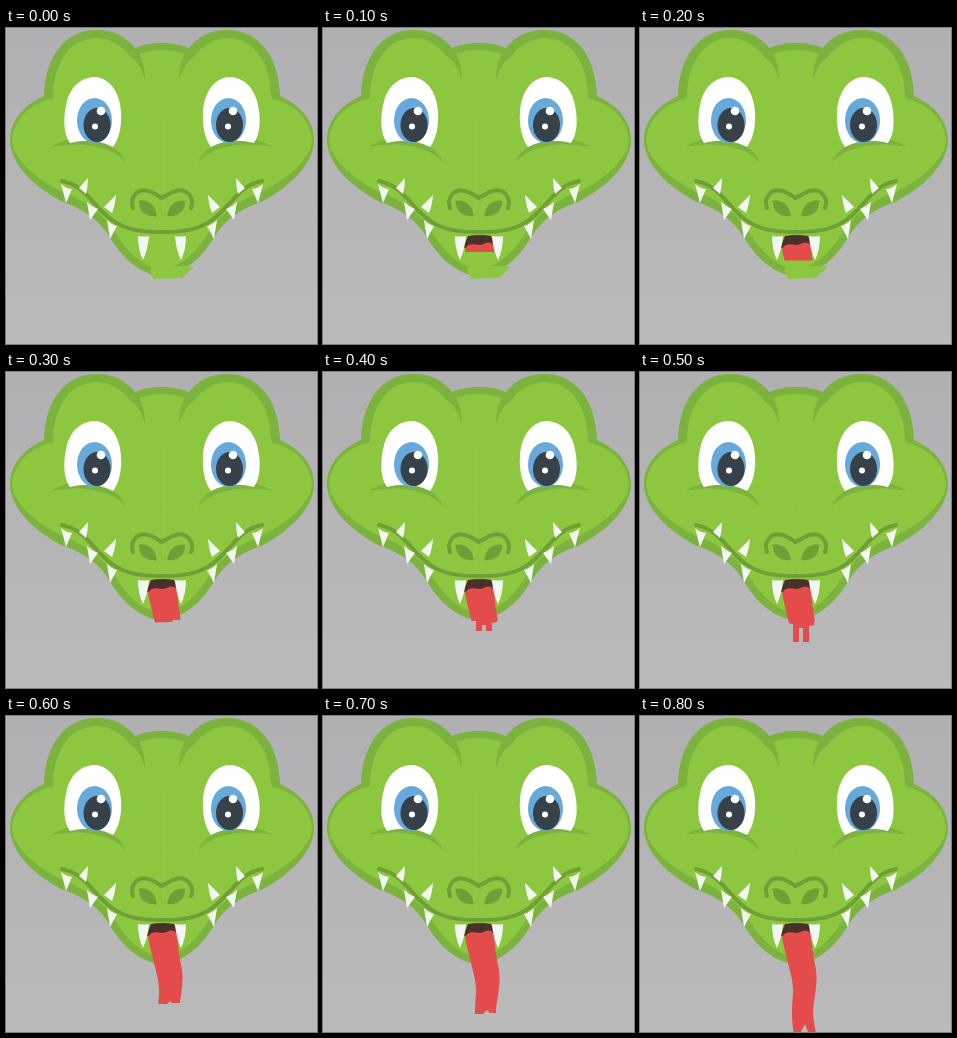
An HTML page for the animation above (1000 ms loop, 311 by 316 pixels).

```html
<!DOCTYPE html>
<html lang="en">
<head>
<meta charset="utf-8">
<title>Crocodile</title>
<style>
  html, body { margin: 0; width: 100%; height: 100%; overflow: hidden; background: #b8b8ba; }
  svg { display: block; width: 311px; height: 316px; }
  .dark { fill: #7cb23e; }
  .light { fill: #8dc63f; }
  .line { fill: none; stroke: #6f9f37; stroke-linecap: round; stroke-linejoin: round; }
  .tooth { fill: #f3f7f2; }
</style>
</head>
<body>
<svg viewBox="0 0 311 316">
  <defs>
    <linearGradient id="sky" x1="0" y1="0" x2="0" y2="1">
      <stop offset="0" stop-color="#b0b0b2"/>
      <stop offset="1" stop-color="#bababb"/>
    </linearGradient>
    <clipPath id="reveal"><polygon id="tip"/></clipPath>
    <g id="half">
      <path class="dark" d="M156 15C145 15 136 17 129 20C119 7 105 1 88 2C59 3 39 29 38 68C18 77 4 92 4 113C5 136 27 158 55 173C78 181 94 192 105 211C116 229 133 246 157 249Z"/>
      <path class="light" d="M156 22C143 22 134 25 125 30C116 17 104 10 89 10C63 11 47 36 47 70C21 77 8 92 6 112C7 132 30 150 54 163C79 172 96 185 108 202C121 225 138 240 157 241Z"/>
      <path class="dark" d="M129 20C135 27 139 38 139 52C136 42 132 34 125 29Z"/>
      <path class="line" stroke-width="4" d="M56 153C81 158 87 179 106 192C121 203 138 204 157 204"/>
      <path class="dark" d="M45 119C69 104 107 107 120 134C104 118 77 113 45 119Z"/>
      <path class="line" stroke-width="4" d="M127 180C123 169 132 160 142 163C149 164 152 169 157 170"/>
      <path class="line" stroke-width="3" d="M134 174C142 173 148 179 149 187"/>
      <path fill="#6f9f37" d="M133 174C143 175 148 180 149 188C140 189 133 183 133 174Z"/>
      <path class="tooth" d="M55 156Q61 161 66 161L60 175Z"/>
      <path class="tooth" d="M82 150Q82 159 80 166L73 160Z"/>
      <path class="tooth" d="M81 174Q86 179 92 181L84 192Z"/>
      <path class="tooth" d="M110 167Q109 178 106 185L98 179Z"/>
      <path class="tooth" d="M101 192Q106 197 111 198L104 211Z"/>
    </g>
    <g id="eye">
      <path fill="#fff" d="M64 115C57 105 57 89 61 73C65 58 76 49 89 49C104 50 114 65 115 84C116 98 113 111 107 119C94 112 80 111 64 115Z"/>
    </g>
  </defs>

  <rect width="311" height="316" fill="url(#sky)"/>
  <use href="#half"/>
  <use href="#half" transform="translate(312 0) scale(-1 1)"/>
  <path id="chin" class="light" d="M146 239L178 238L188 239L178 248L176 250L148 251L144 243Z"/>
  <use href="#eye"/>
  <use href="#eye" transform="translate(312 0) scale(-1 1)"/>
  <g id="pupils"></g>

  <path id="mouth" fill="#49302b" d="M145 208Q157 206 168 208L173 219L140 220Z"/>
  <path id="tongue" fill="#e34c4b" clip-path="url(#reveal)"
    d="M142 221C145 215 151 216 156 217C162 217 166 211 171 218C172 230 173 240 175 249C179 264 174 282 173 294C173 303 175 310 176 318L154 318C151 303 152 290 153 278C154 262 147 248 142 221Z"/>
  <path class="tooth" d="M132 208Q138 209 143 208Q142 221 137 232Q132 222 132 208Z"/>
  <path class="tooth" d="M169 208Q175 209 180 208Q180 222 175 232Q170 222 169 208Z"/>
</svg>
<script>
  const $ = id => document.getElementById(id);

  const ball = (x, y, rx, ry, fill) =>
    `<ellipse cx="${x}" cy="${y}" rx="${rx}" ry="${ry}" fill="${fill}"/>`;
  const pupil = (iris, x, glint, dot) =>
    ball(iris, 92.5, 17.5, 22.5, '#67a9da') + ball(x, 97, 13.5, 17, '#374149') +
    ball(glint, 83, 4.3, 4.3, '#fff') + ball(dot, 98.5, 3, 3, '#fff');
  $('pupils').innerHTML = pupil(88.5, 91, 95, 89) + pupil(222.5, 223.5, 227, 222);

  // Lower edge of the visible tongue, right to left, one entry per step
  const flat = y => `190,${y} 130,${y}`;
  const fork = (y, root) =>
    `190,247 175,247 174,${root} 169,${root + 1} 169,${y} 163,${y} ` +
    `163,${root + 3} 159,${root + 3} 159,${y} 153,${y} 153,${root - 1} 130,248`;
  const tips = [
    null,
    flat(224),
    flat(232.5),
    '190,247 167,248 166,250 130,251',
    fork(259, 250),
    fork(270, 253),
    '190,287 166,287 164,285 161,288 130,288',
    '190,297 167,297 164,294 160,298 130,298',
    '190,316 168,316 165,308 161,316 130,316'
  ];

  const show = (id, on) => $(id).setAttribute('visibility', on ? 'visible' : 'hidden');
  let last = -1;

  function draw() {
    const step = Math.min(8, Math.floor(performance.now() % 1000 / 100));
    if (step !== last) {
      last = step;
      show('chin', step < 3);
      show('mouth', step > 0);
      show('tongue', step > 0);
      if (step) $('tip').setAttribute('points', '130,200 190,200 ' + tips[step]);
    }
    requestAnimationFrame(draw);
  }
  draw();
</script>
</body>
</html>
```
